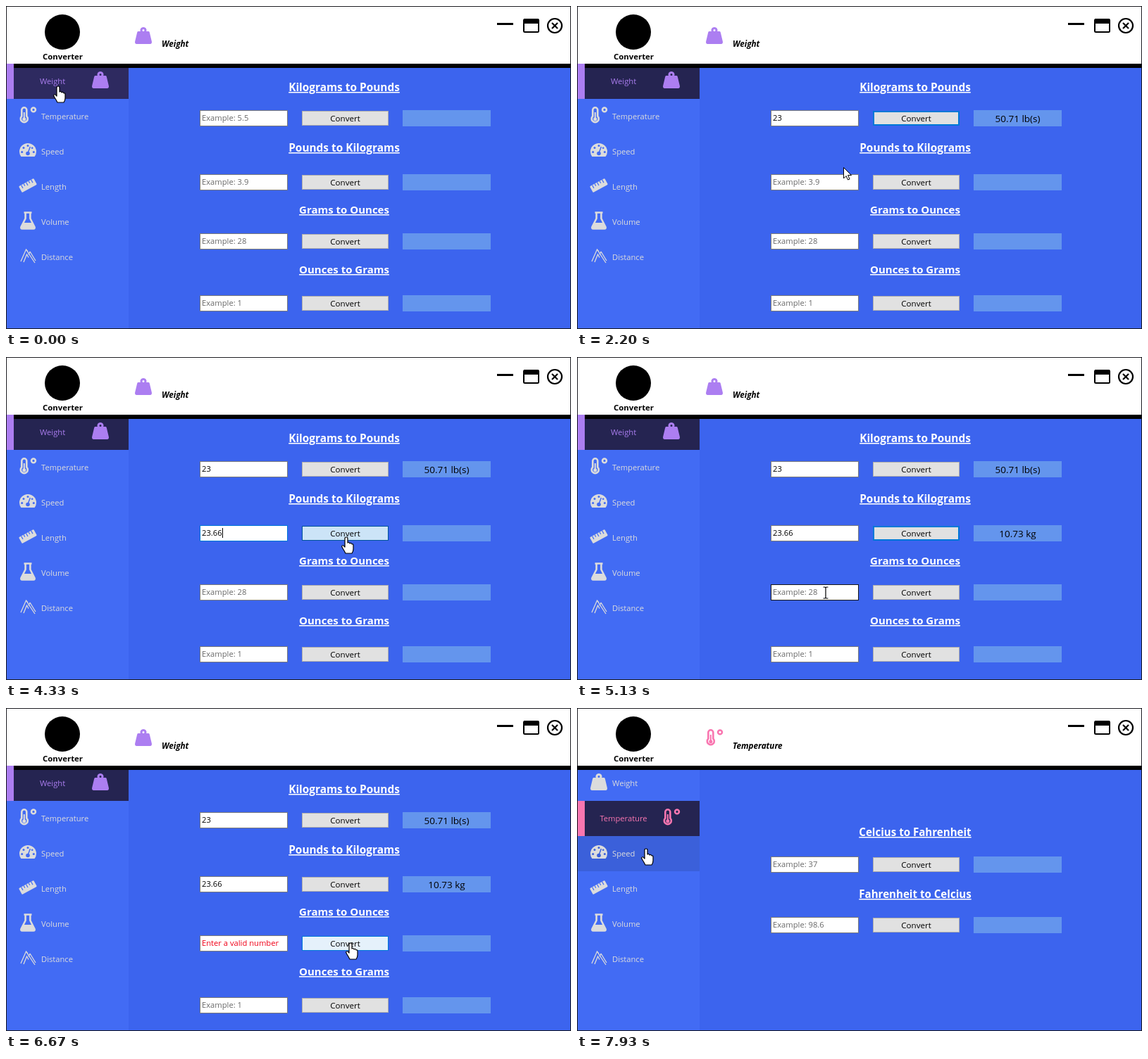
These frames come from a looping animation (802 by 459 pixels, 8 s). An HTML page:

```html
<!DOCTYPE html>
<html lang="en">
<head>
<meta charset="utf-8">
<title>Converter</title>
<style>
  html, body { margin: 0; width: 100%; height: 100%; overflow: hidden; background: #3c64ee; }
  svg { display: block; width: 100vw; height: 100vh; }
  text { font: 11.2px "Open Sans", "Noto Sans", sans-serif; white-space: pre; }
  .bold { font-weight: 700; font-size: 11.4px; }
  .title { font-weight: 700; font-style: italic; font-size: 11.7px; }
  .head { font-weight: 700; fill: #fff; text-decoration: underline; text-decoration-skip-ink: none; }
  .button { font-size: 11.6px; }
  .result { font-size: 13.5px; }
  .mid { text-anchor: middle; }
</style>
</head>
<body>
<svg id="stage" viewBox="0 0 802 459"></svg>
<script>
const stage = document.getElementById('stage');
const LOOP = 8000, FPS = 15;
const PURPLE = '#ac7ef1', PINK = '#f976b0', GREY = '#dcdcdc', SIDE = '#426bf4', ACCENT = '#0078d7';

// Icons are centred on 0,0; c = colour, b = colour behind
const icons = {
  Weight: c => `<path fill="${c}" fill-rule="evenodd" d="M-7.2-6H-4.2A4.5 4.5 0 1 1 4.2-6H7.2Q8.4-6 8.8-4.6L11.9 8.6Q12.4 12 9.6 12H-9.6Q-12.4 12-11.9 8.6L-8.8-4.6Q-8.4-6-7.2-6ZM0-6A1.5 1.5 0 1 0 0-9A1.5 1.5 0 1 0 0-6Z"/>`,
  Temperature: c => `<g fill="none" stroke="${c}" stroke-width="2.6"><path d="M-8.7 1.6V-7.2A3.5 3.5 0 0 1-1.7-7.2V1.6A5 5 0 1 1-8.7 1.6Z"/><circle cx="8" cy="-7.6" r="2.9"/></g>
    <path stroke="${c}" stroke-width="2" d="M-5.2-4V5"/><circle cx="-5.2" cy="5.8" r="2.5" fill="${c}"/>`,
  Speed: (c, b) => `<path fill="${c}" d="M-9.6 9Q-12 5.500-12 2A12 12 0 0 1 12 2Q12 5.500 9.600 9Z"/>
    <g fill="${b}"><circle cx="-8.3" cy="2.500" r="1.5"/><circle cx="-6" cy="-3.500" r="1.5"/><circle cx="0" cy="-6.400" r="1.5"/><circle cx="8.300" cy="2.500" r="1.5"/><circle cx="6.200" cy="-3.200" r="1.300"/><circle cy="4.500" r="2.800"/></g>
    <path stroke="${b}" stroke-width="1.500" d="M0 4L3.400-5"/>`,
  Length: (c, b) => `<g transform="rotate(-29)"><rect x="-12" y="-5" width="24" height="10" rx="1.200" fill="${c}"/>
    <path stroke="${b}" stroke-width="1.200" d="M-8-5V0M-4-5V-1.500M0-5V0M4-5V-1.500M8-5V0"/></g>`,
  Volume: c => `<path fill="none" stroke="${c}" stroke-width="2.600" stroke-linejoin="round" d="M-5.500-11.500H5.500M-3.400-11V-3L-9.500 9Q-10.200 11.500-8 11.500H8Q10.200 11.500 9.500 9L3.400-3V-11"/>
    <path fill="${c}" d="M-6 3H6L9.500 11H-9.500Z"/>`,
  Distance: c => `<path fill="none" stroke="${c}" stroke-width="1.300" d="M-10 8L-2.500-9L10 10M-6 9L-1.500-2L1 2.500M-2.500-9L0-6M3-6L11 7M3-6L1-1.500"/>`
};
const names = Object.keys(icons);

const pages = [
  { name: 'Weight', color: PURPLE, rows: [
    { head: 'Kilograms to Pounds', size: 15.4, y: 148, base: 121,
      text: [[0, 'Example: 5.5'], [667, ''], [867, '2'], [1000, '23']], out: [1733, '50.71 lb(s)'] },
    { head: 'Pounds to Kilograms', size: 15.4, y: 239, base: 207,
      text: [[0, 'Example: 3.9'], [2467, ''], [2600, '2'], [2733, '23'], [3200, '23.'], [3733, '23.6'], [3867, '23.66']], out: [4400, '10.73 kg'] },
    { head: 'Grams to Ounces', size: 15, y: 323, base: 295,
      text: [[0, 'Example: 28'], [5333, ''], [6600, 'Enter a valid number']] },
    { head: 'Ounces to Grams', size: 15, y: 411, base: 380, text: [[0, 'Example: 1']] }
  ] },
  { name: 'Temperature', color: PINK, rows: [
    { head: 'Celcius to Fahrenheit', size: 15.1, y: 211, base: 182, text: [[0, 'Example: 37']] },
    { head: 'Fahrenheit to Celcius', size: 15.1, y: 297, base: 270, text: [[0, 'Example: 98.6']] }
  ] }
];

const PAGE_SWITCH = 7600;
const focusAt = [[0, ''], [667, 'i0'], [1733, 'b0'], [2467, 'i1'], [4400, 'b1'], [5333, 'i2'], [6600, 'b2'], [PAGE_SWITCH, '']];
const presses = [1667, 4333, 6533];
const pointerPath = [
  [0, 74, 114], [667, 340, 160], [1000, 340, 160], [1200, 420, 192], [1400, 474, 167], [1800, 474, 167],
  [2400, 345, 251], [2667, 345, 251], [3000, 445, 255], [3733, 445, 255], [4067, 483, 256], [4400, 483, 256],
  [5133, 353, 335], [6133, 353, 335], [6467, 489, 334], [6667, 489, 334], [7000, 186, 212],
  [7200, 98, 199], [7400, 98, 162], [7600, 98, 162], [7933, 98, 200]
];

const latest = (list, t) => list.filter(e => e[0] <= t).pop()[1];
const inside = (p, x, y, w, h) => p.x >= x && p.x < x + w && p.y >= y && p.y < y + h;
const rect = (x, y, w, h, fill) => `<rect x="${x}" y="${y}" width="${w}" height="${h}" fill="${fill}"/>`;
const framed = (x, y, w, h, line, fill, d = 1) => rect(x, y, w, h, line) + rect(x + d, y + d, w - 2 * d, h - 2 * d, fill);
const label = (s, x, y, cls = '', fill = '#000') => `<text x="${x}" y="${y}" class="${cls}" fill="${fill}">${s}</text>`;
const icon = (name, x, y, c, b) => `<g transform="translate(${x} ${y})">${icons[name](c, b)}</g>`;

function pointerAt(t) {
  const i = pointerPath.findIndex(p => p[0] > t);
  const b = pointerPath[i < 0 ? pointerPath.length - 1 : i];
  const a = i < 0 ? b : pointerPath[i - 1];
  const u = i < 0 ? 0 : (t - a[0]) / (b[0] - a[0]), e = u * u * (3 - 2 * u);
  return { x: Math.round(a[1] + (b[1] - a[1]) * e), y: Math.round(a[2] + (b[2] - a[2]) * e), kind: 'arrow' };
}

const cursors = {
  arrow: '<path fill="#fff" stroke="#000" d="M.5.5V16L4 12.500 6.500 18 9 17 6.600 11.500H11.500Z"/>',
  hand: '<path fill="#fff" stroke="#000" stroke-width="1.2" stroke-linejoin="round" d="M-2 2Q-2 0 0 0T2 2V8Q4 6.500 5 9Q7 7.500 8 10Q10 9 10 12V17Q10 20 8 23H-1Q-3 19-5 16L-6.500 13Q-5 10.500-3 13L-2 14Z"/>',
  beam: '<path fill="none" stroke="#000" stroke-width="1.2" d="M-3.500-8H-1L0-7 1-8H3.500M0-7V7M-3.500 8H-1L0 7 1 8H3.500"/>'
};

function sidebar(page, p) {
  let s = rect(1, 82, 173, 376, SIDE);
  names.forEach((name, i) => {
    const y = 82 + 50 * i, on = name === page.name, over = inside(p, 1, y, 173, 50);
    if (over) p.kind = 'hand';
    const bg = on ? (over ? '#2e2a60' : '#252451') : over ? '#3b60da' : SIDE;
    s += rect(1, y, 173, 50, bg);
    s += on ? label(name, 66, y + 29, 'mid', page.color) + icon(name, 134, y + 23, page.color, bg)
            : label(name, 50, y + 29, '', GREY) + icon(name, 31, y + 23, GREY, bg);
  });
  return s;
}

function converter(row, i, t, p, focus) {
  const { y } = row, value = latest(row.text, t);
  const typing = focus === 'i' + i, overInput = inside(p, 275, y, 125, 23), overButton = inside(p, 420, y + 1, 123, 21);
  if (overInput) p.kind = 'beam';
  if (overButton) p.kind = 'hand';
  const ink = value.startsWith('Example') ? '#696969' : value.startsWith('Enter') ? '#f00018' : '#000';
  let s = `<text x="480" y="${row.base}" class="head mid" style="font-size:${row.size}px">${row.head}</text>`;
  s += framed(275, y, 125, 23, typing ? ACCENT : overInput ? '#171717' : '#7a7a7a', '#fff');
  s += label(value, 278, y + 15, '', ink);
  if (typing) {
    const digits = value.replace('.', '').length;
    s += rect(Math.round(278 + digits * 6.4 + (value.includes('.') ? 3 : 0)), y + 4, 1, 14, '#000');
  }
  const down = overButton && presses.some(at => t >= at && t < at + 66);
  const focused = focus === 'b' + i;
  s += down ? framed(420, y + 1, 123, 21, '#005499', '#cce4f7')
     : overButton ? framed(420, y + 1, 123, 21, ACCENT, '#e5f1fb')
     : framed(420, y + 1, 123, 21, focused ? ACCENT : '#adadad', '#e1e1e1', focused ? 2 : 1);
  s += label('Convert', 481.5, y + 16, 'button mid');
  s += rect(563, y, 125, 23, '#6495ed');
  if (row.out && t >= row.out[0]) s += label(row.out[1], 625.5, y + 17, 'result mid');
  return s;
}

function header(page) {
  return rect(1, 1, 800, 81, '#fff')
    + '<circle cx="80" cy="37" r="25"/>' + label('Converter', 80.5, 76, 'bold mid')
    + icon(page.name, 195, 42, page.color, '#fff') + label(page.name, 221, 58, 'title')
    + rect(697, 24, 23, 3, '#000')
    + '<rect x="735" y="19" width="21" height="18" rx="1.5" fill="none" stroke="#000" stroke-width="2"/>' + rect(735, 18, 21, 7, '#000')
    + '<g fill="none" stroke="#000" stroke-width="2.2"><circle cx="779" cy="28" r="10"/><path d="M775 24l8 8M783 24l-8 8"/></g>';
}

function draw(t) {
  const page = pages[t < PAGE_SWITCH ? 0 : 1], p = pointerAt(t), focus = latest(focusAt, t);
  let s = rect(0, 0, 802, 459, '#3c64ee') + header(page) + sidebar(page, p);
  s += rect(0, 82, 802, 6, '#000') + rect(1, 82 + 50 * names.indexOf(page.name), 10, 50, page.color);
  s += page.rows.map((row, i) => converter(row, i, t, p, focus)).join('');
  s += '<rect x=".5" y=".5" width="801" height="458" fill="none" stroke="#1c1c22"/>';
  // The pointer hides while keys are being pressed
  if (t < 3200 || t >= 3867) s += `<g transform="translate(${p.x} ${p.y})">${cursors[p.kind]}</g>`;
  stage.innerHTML = s;
}

let shown = -1;
function tick() {
  const step = Math.floor((performance.now() % LOOP + 3.4) * FPS / 1000) % (LOOP * FPS / 1000);
  if (step !== shown) draw(Math.round(step * 1000 / FPS));
  shown = step;
  requestAnimationFrame(tick);
}
tick();
</script>
</body>
</html>
```
